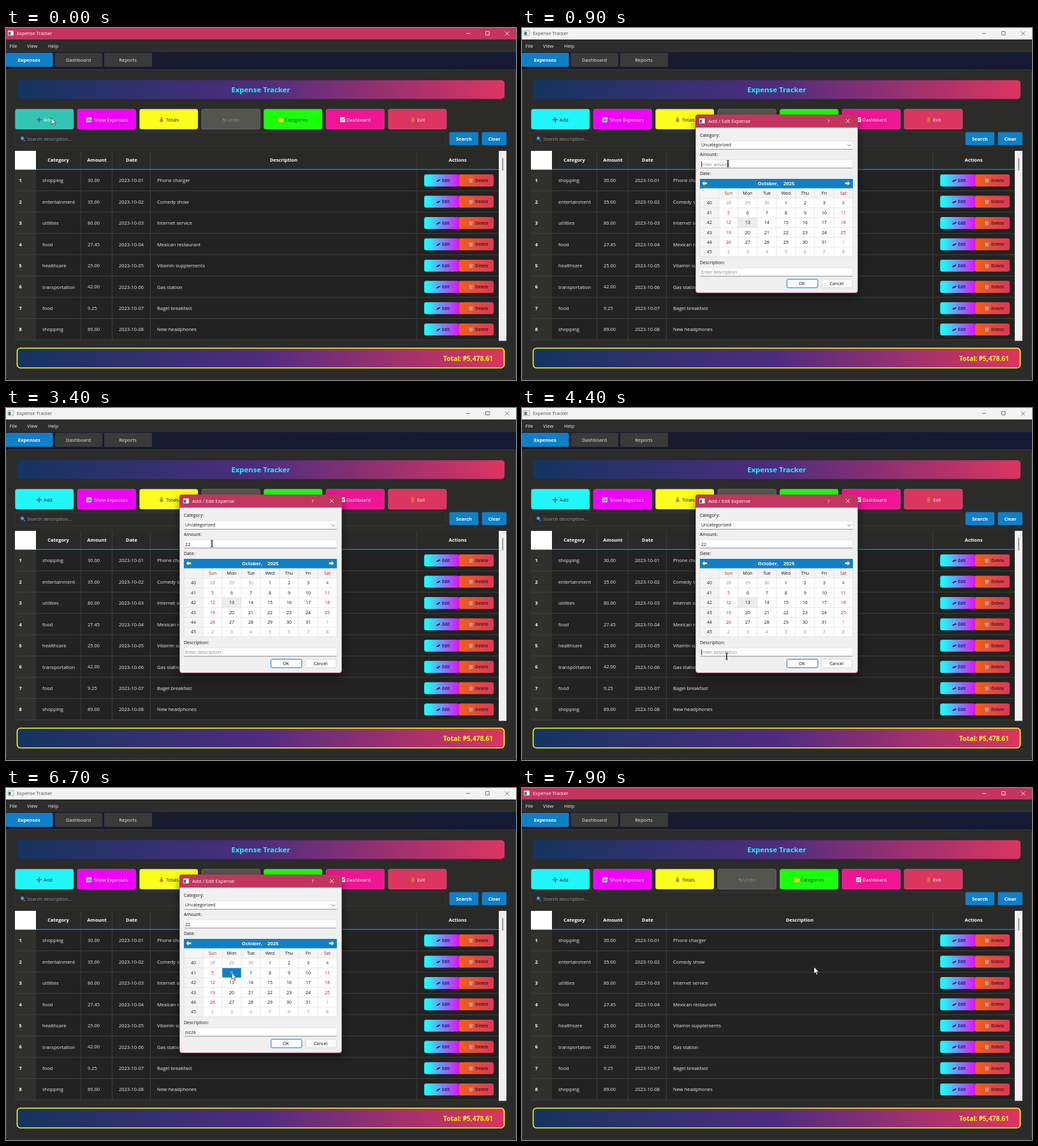
Animation, 800 px wide and 553 px high, one loop 8000 ms. Source, as an HTML page:

```html
<!DOCTYPE html>
<html lang="en">
<head>
<meta charset="utf-8">
<title>Expense Tracker</title>
<style>
html, body { margin: 0; width: 100%; height: 100%; overflow: hidden; background: #171a30; }
svg { display: block; width: 800px; height: 553px; }
text { font-family: "Open Sans", "Noto Sans", sans-serif; white-space: pre; }
</style>
</head>
<body>
<svg id="stage" viewBox="0 0 800 553" xmlns="http://www.w3.org/2000/svg">
  <defs>
    <linearGradient id="band"><stop offset="0" stop-color="#14355f"/><stop offset=".5" stop-color="#4f2c80"/><stop offset="1" stop-color="#dc3560"/></linearGradient>
    <linearGradient id="edit"><stop offset=".1" stop-color="#20f6fa"/><stop offset=".55" stop-color="#7f83fb"/><stop offset="1" stop-color="#e410f4"/></linearGradient>
    <linearGradient id="delete"><stop offset="0" stop-color="#f26016"/><stop offset="1" stop-color="#dc3758"/></linearGradient>
    <linearGradient id="night"><stop offset="0" stop-color="#1a1a2e"/><stop offset="1" stop-color="#141a33"/></linearGradient>
    <filter id="shadow" x="-20%" y="-20%" width="140%" height="140%">
      <feDropShadow dx="0" dy="6" stdDeviation="7" flood-color="#000" flood-opacity=".5"/>
    </filter>
  </defs>
</svg>
<script>
const NS = 'http://www.w3.org/2000/svg';
const BLUE = '#0f80c8', PINK = '#c3345f', INK = '#1a1a2e';
const stage = document.getElementById('stage');
let layer = stage;

function add(tag, attrs, parent = layer) {
  const node = document.createElementNS(NS, tag);
  for (const key in attrs) node.setAttribute(key, attrs[key]);
  return parent.appendChild(node);
}
function group(attrs = {}) {
  return layer = add('g', attrs, stage);
}
function rect(x, y, right, bottom, fill, rx = 0, more = {}) {
  return add('rect', { x, y, width: right - x, height: bottom - y, fill, rx, ...more });
}
function line(d, stroke, width = 1, more = {}) {
  return add('path', { d, stroke, 'stroke-width': width, fill: 'none', ...more });
}
function shape(d, fill, more = {}) {
  return add('path', { d, fill, ...more });
}
// y is the middle of the line; anchor is start, middle or end
function label(str, x, y, size, fill, anchor = 'start', weight = 400) {
  const node = add('text', { x, y: y + size * .357, 'font-size': size, fill, 'text-anchor': anchor, 'font-weight': weight });
  node.textContent = str;
  return node;
}
function appIcon(x, y) {
  rect(x, y, x + 9, y + 8, '#f4f6f6', .5, { stroke: '#777', 'stroke-width': .6 });
  rect(x + 1, y + 2, x + 4.5, y + 7, '#34837f');
}

// Window frame
const titleBar = rect(0, 0, 800, 18, PINK);
appIcon(3, 4);
const titleText = label('Expense Tracker', 17, 8.6, 7.35, '#fff');
const titleMarks = line('M722 8.5h6M752.5 5.5h5.5v5.5h-5.5zM783 5.5l6 6M789 5.5l-6 6', '#fff', .9);
rect(0, 18, 800, 38, '#2d2d2c');
label('File', 5.5, 28, 7.6, '#f2f2f2');
label('View', 33, 28, 7.6, '#f2f2f2');
label('Help', 66, 28, 7.6, '#f2f2f2');
rect(0, 38, 800, 553, 'url(#night)');
[['Expenses', 0, 73.5], ['Dashboard', 77, 151], ['Reports', 154, 229]].forEach(([name, x, right], i) => {
  rect(x, 39, right, 61, i ? '#3a3a39' : BLUE, 2);
  label(name, (x + right) / 2 - .5, 50, 7.6, i ? '#ececec' : '#fff', 'middle', i ? 400 : 700);
});
rect(.5, 65.5, 799.5, 551.5, '#2b2b2a', 3, { stroke: '#3d3d3c' });

// Banner
rect(17, 82, 782, 111.5, 'url(#band)', 5);
label('Expense Tracker', 399.5, 97.3, 11.4, '#20f3fb', 'middle', 700);

// Toolbar
const tools = [
  ['Add', '#21f7fa', INK, 59], ['Show Expenses', '#f000fa', '#fff', 138],
  ['Totals', '#fdff1c', INK, 251], ['Undo', '#555550', '#92928e', 347],
  ['Categories', '#1aff0b', '#1d4a22', 437], ['Dashboard', '#ef1594', '#fff', 534],
  ['Exit', '#db3560', '#fff', 645]
].map(([name, fill, color, x], i) => {
  const left = 14 + i * 97.5;
  const box = rect(left + .5, 127.5, left + 92, 159, fill, 3, { stroke: '#fff', 'stroke-opacity': .18 });
  return { box, text: label(name, x, 144, 7.4, color) };
});
line('M52 140.2v8M48 144.2h8', '#6846b8', 1.8);
rect(126, 140, 134, 148, '#d9e4e8');
line('M128 147v-3M130.2 147v-5M132.4 147v-4', '#2f8d75', 1.4);
shape('M242.5 140h3l-.6 2c2.4 2 3 6-.9 6s-3.3-4-.9-6z', '#c98a5b');
line('M341.5 142l-1.6 1.5 1.6 1.5M340 143.5h3a1.6 1.6 0 0 1 0 3.2h-2', '#92928e', .8);
shape('M427 141h3l1 1h4.5v6H427z', '#f0c830');
rect(524, 140, 532, 148, '#f3e9f0');
line('M525 146.5l2-2.5 2 1 2.4-4', '#d4344c', 1);
rect(635.5, 140, 640, 148.5, '#c47a26');
rect(638.4, 144, 639.2, 145, '#ffe36e');

// Search
rect(14, 163.5, 690, 185, '#2b2b2a', 2, { stroke: '#363635' });
line('M27.5 175.5l2.6 2.4', '#8a6b5a', 1.3);
add('circle', { cx: 25.6, cy: 173.3, r: 2.6, fill: '#4aa3df', stroke: '#1b6fb0', 'stroke-width': .8 });
label('Search description...', 33, 174.3, 7.5, '#989896');
rect(695.5, 163.5, 741, 184, BLUE, 2);
label('Search', 718.2, 174, 7.4, '#fff', 'middle', 700);
rect(746.5, 163.5, 785, 184, BLUE, 2);
label('Clear', 766, 174, 7.4, '#fff', 'middle', 700);

// Table
rect(14, 193, 773, 491, '#212221');
rect(14, 193, 47, 491, '#30302d');
rect(47, 193, 773, 222, '#292928');
rect(14, 193, 47, 222.5, '#fff');
for (const x of [118, 167, 227, 645]) line(`M${x - .5} 193V491`, '#3b3b3a');
[['Category', 82], ['Amount', 142.5], ['Date', 197], ['Description', 435.5], ['Actions', 708.5]]
  .forEach(([name, x]) => label(name, x, 207.8, 7.5, '#fff', 'middle', 700));
const expenses = [
  ['shopping', '30.00', 'Phone charger'], ['entertainment', '35.00', 'Comedy show'],
  ['utilities', '80.00', 'Internet service'], ['food', '27.45', 'Mexican restaurant'],
  ['healthcare', '25.00', 'Vitamin supplements'], ['transportation', '42.00', 'Gas station'],
  ['food', '9.25', 'Bagel breakfast'], ['shopping', '89.00', 'New headphones']
];
expenses.forEach(([kind, amount, note], i) => {
  const y = 239.6 + i * 33.45;
  line(`M14 ${y + 16.2}H773`, '#424240');
  label(i + 1, 20.5, y, 7.4, '#fff', 'start', 700);
  label(kind, 57, y, 7.6, '#ececec');
  label(amount, 128, y, 7.4, '#ececec');
  label(`2023-10-0${i + 1}`, 177, y, 7.5, '#ececec');
  label(note, 237, y, 7.6, '#ececec');
  rect(710, y - 9.5, 765, y + 9.3, 'url(#delete)', 3);
  rect(656, y - 9.5, 711, y + 9.3, 'url(#edit)', 3);
  line(`M675.5 ${y + 1.6}l5.4 -2.6`, INK, 2);
  label('Edit', 684, y, 6.3, '#24205c', 'start', 700);
  shape(`M726 ${y - 3}h6.5l-.8 6.5h-4.9z`, '#b59a95');
  label('Delete', 736, y, 6.3, '#3a1c34', 'start', 700);
});
line('M47 222.3H773', BLUE, 1.5);
rect(773, 193, 785, 491.5, '#f0f0f0');
rect(778.4, 204, 780, 224, '#858585', .8);

// Total
rect(17.5, 503, 781.5, 534, 'url(#band)', 5, { stroke: '#fcff20', 'stroke-width': 1.6 });
label('Total: ₱5,478.61', 764, 519, 10.3, '#fcff20', 'end', 700);

// Dialog
const dialog = group();
rect(272, 136, 527, 416.5, PINK, 4, { filter: 'url(#shadow)' });
shape('M272.7 156.5H526.3V412a4 4 0 0 1-4 3.7H276.7a4 4 0 0 1-4-3.7z', '#f0f0f0');
appIcon(278, 142);
label('Add / Edit Expense', 292, 146.3, 7.65, '#fff');
label('?', 481, 146, 8, '#fff', 'middle');
line('M508 143l6 6M514 143l-6 6', '#fff', .9);
[['Category:', 169], ['Amount:', 199], ['Date:', 229], ['Description:', 368.5]]
  .forEach(([name, y]) => label(name, 279, y, 7, '#111'));
for (const y of [177.5, 207, 377]) {
  rect(279, y, 519, y + 13, '#fff', 1.5, { stroke: '#dcdcdc', 'stroke-width': .7 });
  line(`M279.5 ${y + 13}H518.5`, '#868686', .9);
}
label('Uncategorized', 281, 184, 7, '#111');
line('M510.5 182.8l2.8 2.8 2.8-2.8', '#555', .8);

// Calendar
const COL = 30, ROW = 15.4;
rect(279, 237, 519, 252, BLUE);
label('October,', 370, 244.7, 7.4, '#fff', 'start', 700);
label('2025', 410, 244.7, 7.7, '#fff', 'start', 700);
const arrow = 'M0-4.2L-4.4 0 0 4.2V1.7H4.2V-1.7H0z';
shape(arrow, '#f5f7c4', { transform: 'translate(286.5 244)', stroke: '#4d7d38', 'stroke-width': .7 });
shape(arrow, '#f5f7c4', { transform: 'translate(510.5 244) scale(-1 1)', stroke: '#4d7d38', 'stroke-width': .7 });
rect(279, 252, 519, 359.5, '#fff');
rect(279, 252, 519, 267.2, '#f4f4f4');
rect(279, 252, 309, 359.5, '#f4f4f4');
const cellRect = row => rect(339, 267.2 + row * ROW, 369, 267.2 + (row + 1) * ROW, '#ececec');
const today = cellRect(2), picked = cellRect(1);
picked.setAttribute('fill', BLUE);
for (let c = 1; c < 8; c++) line(`M${279 + c * COL} 252V359.5`, '#dedede', .7);
for (let r = 0; r < 6; r++) line(`M279 ${267.2 + r * ROW}H519`, '#dedede', .7);
rect(279, 252, 519, 359.5, 'none', 0, { stroke: '#d4d4d4', 'stroke-width': .6 });
['Sun', 'Mon', 'Tue', 'Wed', 'Thu', 'Fri', 'Sat'].forEach((day, c) =>
  label(day, 324 + c * COL, 259.6, 7, c === 0 ? '#a03a10' : c === 6 ? '#cc1020' : '#111', 'middle'));
let sixth;
for (let r = 0; r < 6; r++) {
  const y = 275 + r * ROW;
  label(40 + r, 294, y, 7, '#222', 'middle');
  for (let c = 0; c < 7; c++) {
    const n = r * 7 + c - 2;
    const inside = n >= 1 && n <= 31;
    const color = !inside ? '#8c8c8c' : c % 6 === 0 ? '#cc1020' : '#111';
    const node = label(n < 1 ? n + 30 : n > 31 ? n - 31 : n, 324 + c * COL, y, 7, color, 'middle');
    if (n === 6) sixth = node;
  }
}

// Inputs and buttons
const fields = [
  { hint: 'Enter amount', y: 214, focus: 800, blur: 4300,
    edits: [[1900, '2'], [2100, '22'], [2300, '225'], [2800, '22']] },
  { hint: 'Enter description', y: 383.7, focus: 4300, blur: 6600,
    edits: [[4700, 'p'], [4900, 'pi'], [5100, 'piz'], [5300, 'pizz'], [5500, 'pizza']] }
];
for (const f of fields) {
  f.text = label('', 281, f.y, 7.05, '#111');
  f.caret = rect(0, f.y - 4.5, .8, f.y + 4.5, '#111');
}
const okBox = rect(415.7, 394.7, 464, 408, '#fdfdfd', 2, { stroke: '#0f78c4', 'stroke-width': 1 });
label('OK', 439, 401.5, 7, '#111', 'middle');
rect(470, 394.7, 518, 408, '#fdfdfd', 2, { stroke: '#cfcfcf', 'stroke-width': .8 });
label('Cancel', 493.5, 401.5, 7, '#111', 'middle');

// Pointers
group();
const pointer = shape('M0 0V10.8L2.5 8.6 4.2 12.4 6 11.6 4.3 7.9H7.7z', '#fff', { stroke: '#111', 'stroke-width': .7 });
const beam = line('M-2-5h1.4q.6 0 .6.6v8.8q0 .6-.6.6H-2M2-5H.6q-.6 0-.6.6v8.8q0 .6.6.6H2', '#111', .9);

const path = [
  [200, 71, 141], [800, 323, 213], [3700, 323, 213], [4300, 321, 390], [5700, 321, 390], [5900, 328, 385],
  [6500, 354, 290], [6800, 354, 290], [7300, 438, 404], [7500, 438, 404], [7900, 458, 281]
];
function pointerAt(t) {
  const next = path.findIndex(p => p[0] > t);
  if (next === 0) return path[0].slice(1);
  if (next < 0) return path[path.length - 1].slice(1);
  const [t0, x0, y0] = path[next - 1], [t1, x1, y1] = path[next];
  const u = (t - t0) / (t1 - t0), k = u * u * (3 - 2 * u);
  return [x0 + (x1 - x0) * k, y0 + (y1 - y0) * k];
}
function show(node, on) {
  node.setAttribute('visibility', on ? 'visible' : 'hidden');
}

function drawField(f, t) {
  const done = f.edits.filter(e => e[0] <= t);
  const last = done[done.length - 1];
  f.text.textContent = last ? last[1] : f.hint;
  f.text.setAttribute('fill', last ? '#111' : '#858585');
  const since = t - (last ? last[0] : f.focus);
  const on = t >= f.focus && t < f.blur && since % 1000 < 500;
  f.caret.setAttribute('x', last ? 281.4 + f.text.getComputedTextLength() : 281);
  f.caret.setAttribute('opacity', on ? 1 : 0);
}

function draw(t) {
  const active = t < 200 || t >= 7600;
  const hover = t < 200;
  titleBar.setAttribute('fill', active ? PINK : '#f3f3f3');
  titleText.setAttribute('fill', active ? '#fff' : '#4c4c4c');
  titleMarks.setAttribute('stroke', active ? '#fff' : '#666');
  tools[0].box.setAttribute('fill', hover ? '#33c5b4' : '#21f7fa');
  tools[0].text.setAttribute('fill', hover ? '#eafffb' : INK);

  const opacity = active ? 0 : t < 300 ? .55 : t < 7500 ? 1 : .5;
  dialog.setAttribute('opacity', opacity);
  fields.forEach(f => drawField(f, t));
  const chosen = t >= 6600;
  today.setAttribute('fill', chosen ? '#fff' : '#ececec');
  picked.setAttribute('opacity', chosen ? 1 : 0);
  sixth.setAttribute('fill', chosen ? '#fff' : '#111');

  const [x, y] = pointerAt(t);
  const overOk = x > 415 && x < 464 && y > 394 && y < 409;
  okBox.setAttribute('fill', overOk ? '#dcecf8' : '#fdfdfd');
  const overField = !active && x > 279 && x < 519 && (y > 206 && y < 221 || y > 376 && y < 392);
  show(pointer, !overField);
  show(beam, overField);
  const at = `translate(${x.toFixed(1)} ${y.toFixed(1)})`;
  pointer.setAttribute('transform', at);
  beam.setAttribute('transform', at);
}

const LOOP = 8000, STEP = 100;
const start = performance.now();
function tick() {
  const t = (performance.now() - start) % LOOP;
  draw(Math.floor(t / STEP) * STEP);
  requestAnimationFrame(tick);
}
tick();
</script>
</body>
</html>
```
